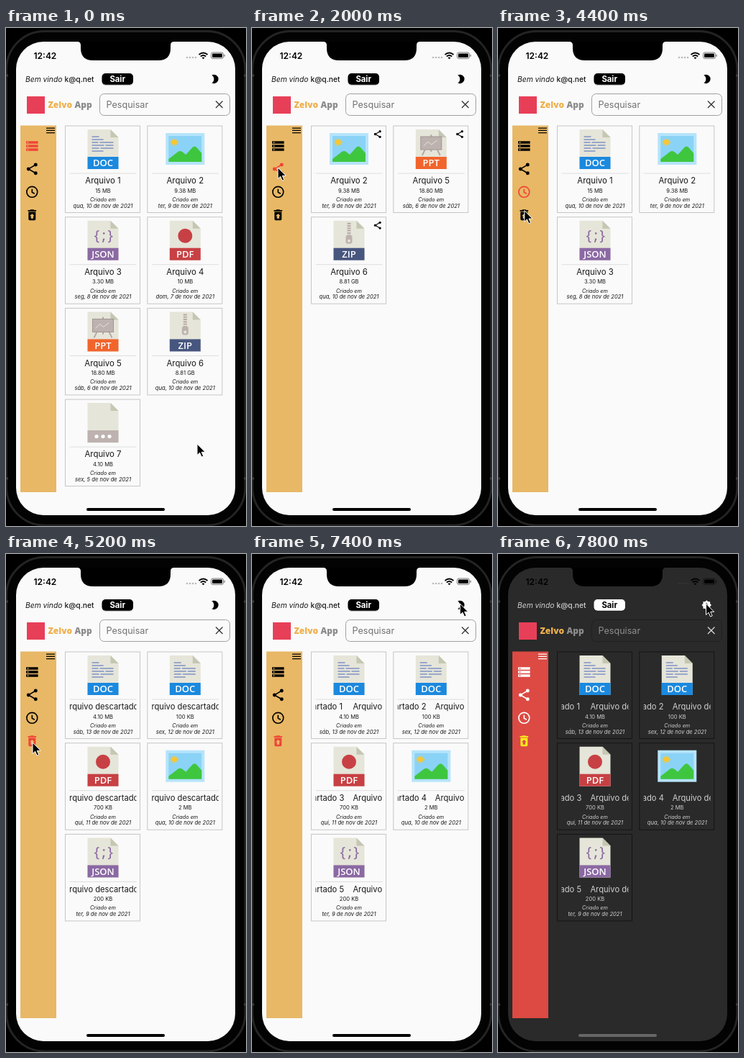
These frames come from a looping animation (334x692 px, 8000 ms). An HTML page:

```html
<!DOCTYPE html>
<html lang="pt">
<head>
<meta charset="utf-8">
<title>Arquivos</title>
<style>
html, body { margin: 0; height: 100%; overflow: hidden; background: #000; }
#stage { display: block; width: 100vw; height: 100vh; font-family: Inter, sans-serif; }
.text { fill: var(--text); }
.icon { fill: var(--icon); stroke: var(--icon); stroke-width: 0; }
.icon.active { fill: var(--active); stroke: var(--active); }
.line { fill: none; stroke-width: 2; }
.mid { text-anchor: middle; }
.it { font-style: italic; }
.label { fill: #fff; font: 600 13px "Open Sans", sans-serif; text-anchor: middle; }
.brand { font: 800 12px "Open Sans", sans-serif; }
.gray { fill: #bdb2b0; }
</style>
</head>
<body>
<svg id="stage" viewBox="0 0 334 692" preserveAspectRatio="none">
  <rect width="334" height="692"/>
  <rect x=".5" y="4.5" width="332.5" height="686.5" rx="53" fill="#030303" stroke="#242424" stroke-width="3"/>
  <path d="M0 66h3M331 66h3M0 626h3M331 626h3" stroke="#3a3a3a" stroke-width="3"/>
  <rect x="14" y="19" width="305" height="658" rx="38" fill="var(--bg)"/>
  <path d="M99 19q5 0 5 5v4q0 17 17 17h91q17 0 17-17v-4q0-5 5-5z"/>

  <text x="38.5" y="42.5" font-size="12" font-weight="600">12:42</text>
  <g fill="var(--dots)"><circle cx="252" cy="41" r="1.3"/><circle cx="256" cy="41" r="1.3"/><circle cx="260" cy="41" r="1.3"/><circle cx="264" cy="41" r="1.3"/></g>
  <path d="M268.5 37q6-5 12 0M270.8 39.5q3.7-3 7.4 0" fill="none" stroke="#000" stroke-width="1.9"/>
  <path d="M272.5 41.2q2-1.5 4 0l-2 2z"/>
  <rect x="285.5" y="34" width="17" height="8.5" rx="2.5" fill="none" stroke="#000" stroke-opacity=".5"/>
  <rect x="287" y="35.5" width="14" height="5.5" rx="1.2"/>
  <rect x="303.5" y="36.8" width="1.3" height="3" rx=".6" opacity=".5"/>

  <text class="text it" x="27" y="74.5" font-size="10.3">Bem vindo</text>
  <text class="text" x="81.5" y="74.5" font-size="10.3" font-weight="500">k@q.net</text>
  <rect x="133.5" y="64" width="43.5" height="16" rx="5" fill="#000" opacity=".2"/>
  <rect x="133.5" y="63" width="43.5" height="15.8" rx="5" fill="var(--icon)"/>
  <text class="mid" x="155.2" y="75" font-size="11.3" font-weight="700" fill="var(--button)">Sair</text>
  <path id="moon" class="icon" transform="translate(283.2 63.5) scale(.62)" d="M10 2c-1.8 0-3.5.5-5 1.35 3 1.73 5 4.95 5 8.65s-2 6.92-5 8.65c1.5.85 3.2 1.35 5 1.35a10 10 0 0 0 0-20z"/>
  <g id="sun" class="icon" transform="translate(290.3 71)">
    <rect x="-4.8" y="-4.8" width="9.6" height="9.6"/><rect x="-4.8" y="-4.8" width="9.6" height="9.6" transform="rotate(45)"/>
    <path d="M-1.5-3.6a3.7 3.7 0 0 1 0 7.2 5 5 0 0 0 0-7.2z" fill="var(--bg)"/>
  </g>

  <rect x="29" y="95" width="25" height="24" fill="#e83f58"/>
  <text class="brand" x="58.5" y="110.5" fill="#efb04d">Zelvo</text>
  <text class="brand" x="95.5" y="110.5" fill="#8c8c8c">App</text>

  <rect x="20" y="135.5" width="50" height="509.5" fill="var(--side)"/>
  <path class="icon" d="M56 139.2h12M56 142.4h12M56 145.6h12" style="stroke-width:1.2"/>
  <g id="menu"></g>
  <g id="pages"></g>
  <rect x="112" y="667" width="109" height="4" rx="2" fill="var(--home)"/>
  <path id="cursor" d="M0 0v15.5l3.6-3.3 2.5 5.8 2.6-1.1-2.5-5.6h5z" stroke="#fff"/>
</svg>
<script>
const LOOP = 8000, STEP = 200;
const $ = id => document.getElementById(id);

// Icons on a 24-unit grid
const icons = {
  storage: '<path fill-rule="evenodd" d="M2 4h20v4H2zM4 5v2h2V5zM2 10h20v4H2zM4 11v2h2v-2zM2 16h20v4H2zM4 17v2h2v-2z"/>',
  share: '<circle cx="18" cy="5" r="3"/><circle cx="6" cy="12" r="3"/><circle cx="18" cy="19" r="3"/><path class="line" d="M18 5 6 12l12 7"/>',
  clock: '<g class="line"><circle cx="12" cy="12" r="9"/><path d="M12 7v5.5l4.2 2.5"/></g>',
  trash: '<path fill-rule="evenodd" d="M6 7h12v12q0 2-2 2H8q-2 0-2-2zM12 10l-4 4h2v4h4v-4h2zM5 4h3.5l1-1h5l1 1H19v2H5z"/>'
};
const icon = (name, cx, cy, scale) =>
  `<g class="icon" transform="translate(${cx} ${cy}) scale(${scale}) translate(-12 -12)">${icons[name]}</g>`;
$('menu').innerHTML = Object.keys(icons).map((name, i) => icon(name, 36.3, 164 + 31.9 * i, .83)).join('');
const menuItems = [...$('menu').children];

// File pictures, relative to the card corner
const paper = (color, label, art) => `
  <path d="M31 5h32l11 11v44H31z" fill="#e6e5d9"/><path d="M63 5v11h11z" fill="#c5c7b2"/>
  ${art}<rect x="31" y="43" width="43" height="17" fill="${color}"/>
  <text class="label" x="52.5" y="56.4">${label}</text>`;
const pictures = {
  doc: paper('#1b89de', 'DOC', '<path d="M37 15h10M37 19h16M37 23h9m2 0h19M37 27h17m2 0h11M37 31h10m2 0h18M37 35h16" stroke="#7f92c6" stroke-width="1.5"/>'),
  json: paper('#8b69a3', 'JSON', '<text class="mid" x="52" y="32" font-size="20" fill="#8b69a3" font-family="Noto Sans Mono, monospace" letter-spacing="-2.5">{;}</text>'),
  pdf: paper('#c74044', 'PDF', '<circle cx="52.5" cy="26" r="10" fill="#c74044"/>'),
  ppt: paper('#f1652d', 'PPT', '<path d="M52.5 12v24M44 33l-4 8M61 33l4 8" stroke="#b5a9a7" stroke-width="2"/><rect x="38" y="15" width="29" height="18" fill="#bdb2b0" stroke="#a09492"/><path d="M42 28l6-6 5 4 8-6" fill="none" stroke="#e6e5d9"/>'),
  zip: paper('#47567f', 'ZIP', '<path d="M52.5 8v18" stroke="#b5a9a7" stroke-width="5" stroke-dasharray="2 1.3"/><rect x="48" y="25" width="9" height="12" rx="3" class="gray"/><circle cx="52.5" cy="33" r="2" fill="#e6e5d9"/>'),
  other: paper('#bdb2b0', '', '') + [43.5, 52.5, 61.5].map(x => `<circle cx="${x}" cy="51.5" r="2.6" fill="#fff"/>`).join(''),
  image: `<rect x="25.5" y="10" width="54" height="44" fill="#b5e4fa"/><rect x="29.5" y="14" width="46" height="36" fill="#8ad3f7"/>
    <circle cx="37.5" cy="22.5" r="3.8" fill="#fbc62f"/><circle cx="37.5" cy="22.5" r="5" fill="none" stroke="#fbc62f" stroke-width="1.3" stroke-dasharray="1.4 1.6"/>
    <path d="M29.5 50v-4l13-10q3-2 6 0l5 4 9-10q3-3 6 0l7 8v12z" fill="#3fc63f"/>`
};

const file = (kind, number, size, date) => ({ kind, title: 'Arquivo ' + number, size, date });
const files = [
  file('doc', 1, '15 MB', 'qua, 10'), file('image', 2, '9.38 MB', 'ter, 9'), file('json', 3, '3.30 MB', 'seg, 8'),
  file('pdf', 4, '10 MB', 'dom, 7'), file('ppt', 5, '18.80 MB', 'sáb, 6'), file('zip', 6, '8.81 GB', 'qua, 10'),
  file('other', 7, '4.10 MB', 'sex, 5')
];
const discarded = [
  file('doc', 1, '4.10 MB', 'sáb, 13'), file('doc', 2, '100 KB', 'sex, 12'), file('pdf', 3, '700 KB', 'qui, 11'),
  file('image', 4, '2 MB', 'qua, 10'), file('json', 5, '200 KB', 'ter, 9')
].map(f => ({ ...f, title: f.title.replace(' ', ' descartado '), scrolls: true }));

const TITLE_PERIOD = 126;
const centered = (y, size, content, extra = '') =>
  `<text class="text mid ${extra}" x="52.5" y="${y}" font-size="${size}">${content}</text>`;
const title = f => !f.scrolls ? centered(80.2, 11.4, f.title) : `
  <svg x="6" y="68" width="93" height="17"><g class="scroll">${[0, TITLE_PERIOD].map(x =>
    `<text class="text" x="${x}" y="12.2" font-size="11.2">${f.title}</text>`).join('')}</g></svg>`;
const card = (f, i, shared) => `
  <g transform="translate(${82.5 + i % 2 * 114.3} ${136 + (i >> 1) * 126.7})">
    <rect width="104" height="120.5" fill="none" stroke="var(--border)"/>
    ${pictures[f.kind]}
    <path d="M6 66h93" stroke="var(--divider)"/>
    ${title(f)}
    ${centered(92.6, 7.6, f.size)}
    ${centered(105, 7.3, 'Criado em', 'it')}
    ${centered(113.5, 7.6, f.date + ' de nov de 2021', 'it')}
    ${shared ? icon('share', 92.3, 11.5, .55) : ''}
  </g>`;
const search = `
  <rect x="130.5" y="91.5" width="181" height="30" rx="6" fill="none" stroke="var(--field)"/>
  <text class="text" x="139.5" y="110.5" font-size="12.6" fill-opacity=".6">Pesquisar</text>
  <path class="icon" d="M292 101.5l9.5 9.5m0-9.5-9.5 9.5" style="stroke-width:1.3" opacity=".8"/>`;
const pageFiles = [files, [files[1], files[4], files[5]], files.slice(0, 3), discarded];
$('pages').innerHTML = pageFiles.map((list, p) =>
  `<g>${search}${list.map((f, i) => card(f, i, p === 1)).join('')}</g>`).join('');
const pages = [...$('pages').children];
const scrollers = document.querySelectorAll('.scroll');

// Menu click and start of the page fade, per page
const clicks = [0, 1200, 3000, 4600];
const fades = [-1000, 1350, 3120, 4780];
const FADE_TIME = 320;

// Time, x, y of the pointer
const path = [
  [0, 266, 578], [1200, 36, 194], [2050, 36, 194], [2400, 36, 222], [2600, 36, 220], [4150, 36, 220],
  [4500, 37, 262], [5250, 37, 262], [6400, 290, 77], [6700, 290, 77], [7000, 289.5, 69], [LOOP, 289.5, 69]
];

// Light colour, dark colour; "late" ones follow the text styles
const theme = {
  bg: ['#fafafa', '#2a2a2a'], side: ['#e8b866', '#dc4a43'], icon: ['#000', '#fff'], active: ['#f04438', '#f8ea1c'],
  border: ['#c6c6c6', '#141414'], field: ['#a0a0a0', '#202020'], divider: ['#dedede', '#2c2c2c'], dots: ['#bbb', '#333'],
  text: ['#181818', '#d0d0d0', 'late'], button: ['#fff', '#000', 'late'], home: ['#000', '#666', 'late']
};

const ramp = (t, from, to) => Math.min(1, Math.max(0, (t - from) / (to - from)));
const ease = p => p * p * (3 - 2 * p);

function draw(t) {
  const k = path.findIndex(point => point[0] > t);
  const [t0, x0, y0] = path[k - 1], [t1, x1, y1] = path[k];
  const p = ease(ramp(t, t0, t1));
  $('cursor').setAttribute('transform', `translate(${x0 + (x1 - x0) * p} ${y0 + (y1 - y0) * p})`);

  const selected = clicks.filter(c => c <= t).length - 1;
  menuItems.forEach((item, i) => item.classList.toggle('active', i === selected));

  const shown = fades.map(start => ramp(t, start, start + FADE_TIME));
  pages.forEach((page, i) => {
    const opacity = shown[i] * (1 - (shown[i + 1] || 0));
    page.style.opacity = opacity;
    page.style.display = opacity ? '' : 'none';
  });

  const shift = Math.max(0, t - 4930) * .03 % TITLE_PERIOD;
  scrollers.forEach(s => s.setAttribute('transform', `translate(${-shift} 0)`));

  const dark = ramp(t, 7432, 7632), late = ramp(t, 7580, 7780);
  for (const [name, [day, night, lag]] of Object.entries(theme))
    $('stage').style.setProperty('--' + name, `color-mix(in srgb, ${day}, ${night} ${100 * (lag ? late : dark)}%)`);
  $('moon').style.display = dark ? 'none' : '';
  $('sun').style.display = dark ? '' : 'none';
}

const start = performance.now();
function tick() {
  const t = (performance.now() - start) % LOOP;
  draw(Math.floor(t / STEP) * STEP);
  requestAnimationFrame(tick);
}
tick();
</script>
</body>
</html>
```
